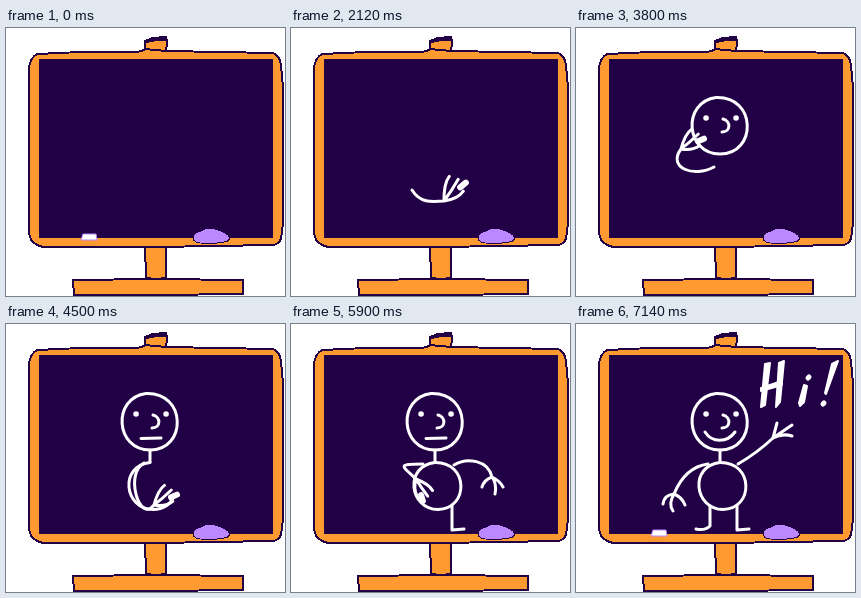
An HTML page that plays this animation: 279x268 px, repeating every 8000 ms.

```html
<!DOCTYPE html>
<html lang="en">
<head>
<meta charset="utf-8">
<title>Chalkboard greeting</title>
<style>
  html, body { margin: 0; width: 100%; height: 100%; overflow: hidden; background: #fff; }
  svg { display: block; width: 100%; height: 100%; }
  .board { fill: #ff9a30; stroke: #220046; stroke-width: 2; stroke-linejoin: round; shape-rendering: crispEdges; }
  .line { fill: none; stroke: #fff; stroke-width: 3; stroke-linecap: round; stroke-linejoin: round; }
  .dot { stroke-width: 5.5; }
</style>
</head>
<body>
<svg viewBox="0 0 279 268">
  <g class="board">
    <path d="M139 14L146 10L160 9L161 13L160 25H140Z"/>
    <path d="M139 13L147 10L159 9.500L161 12L150 12L140 14Z" fill="#220046"/>
    <path d="M139 217H160L160 250L150 251L140 250Z"/>
    <path d="M67 252L150 251L237 252L237 266L150 267L68 267Z"/>
    <path d="M31 26Q80 23 130 24L136 23L139 21L160 23L267 25Q274 28 275 37L277 60L277 195L275 211Q272 217 266 217L150 219L40 219Q31 219 25 212L23 205L23 40Q24 30 31 26Z"/>
    <path d="M33 31H267V210H33Z" fill="#220046" stroke="none"/>
    <path d="M187 210Q188 204 195 203Q203 198 212 202Q222 205 224 210Q222 215 214 214Q207 217 199 215Q188 216 187 210Z" fill="#bb88ff" stroke-width="1"/>
  </g>
  <path id="shelf" d="M77 206H90L91 212H75Z" fill="#fff" stroke="#bb88ff"/>

  <g class="line">
    <path id="firstArm" d="M121 162C129 175 140 174 153 173Q157 164 165 160Q157 164 153 173Q165 163 177 164Q165 163 153 173Q164 174 177 171"/>
    <path id="eyeL" class="dot" d="M130 90h.1"/>
    <path id="eyeR" class="dot" d="M160 90h.1"/>
    <path id="nose" d="M147 91C155 93 155 104 146 104"/>
    <path id="head" d="M140 69.500C106 74 109 126 144 126C181 126 181 68 140 69.500"/>
    <path id="mouth" d="M135 114.500L155 114"/>
    <path id="neck" d="M144 126V138"/>
    <path id="body" d="M144 138.500C113 142 118 185 147 185.500C178 185 178 138 144 138.500"/>
    <path id="armDown" d="M163 141C176 133 197 136 201 153Q209 157 212 163Q209 157 201 153Q206 160 204 170Q206 160 201 153Q193 156 191 163"/>
    <path id="legR" d="M161 181L161 206L173 205"/>
    <path id="legL" d="M134 182L134 202Q129 207 120 205"/>
    <path id="smile" d="M129 108C136 119 151 119 159 108"/>
    <g id="finale">
      <path d="M132 140C117 142 105 153 98 170Q88 171 87 180M98 170Q92 180 97 187M98 170Q106 173 109 181M162 140Q181 129 197 114"/>
      <path id="wave" d="M201 99L197 114L216 101M197 114Q206 109 216 112"/>
      <g aria-label="Hi!" fill="#fff" stroke-width="2">
        <path d="M189 40L194 39L189 81L185 83ZM203 39L208 37L204 78L200 83ZM185 64L206 57L206 61L185 67Z"/>
        <path d="M228 61L231 62L228 78L224 82L223 79ZM256 40L262 37L250 70L249 69Z"/>
        <path stroke-width="5" d="M232 54l1-1M247 80l1-1"/>
      </g>
    </g>
    <path id="arm"/>
    <path id="chalk" stroke-width="6"/>
  </g>
</svg>
<script>
const $ = id => document.getElementById(id);

// shoulder point, its curve handle, the wrist's curve handle, wrist relative to chalk
const ARMS = {
  reach: [121, 162, 8, 13, -13, 1, -19, 16],
  up:    [136, 143, 14, 8, 0, 24, -4, 20],
  left:  [138, 139, -20, 11, -14, 19, -20, 9],
  cross: [135, 138, 1, 28, -22, 2, -19, 7],
  low:   [132, 140, -26, 0, -15, -14, -6, -19]
};

// what the chalk does: stroke id or resting point, first and last step, arm, step of erasure
const MOVES = [
  [[83, 209], -2, -2, 'reach'],
  ['firstArm', 1, 4, 'reach', 5],
  [[172, 157], 5, 5, 'reach'],
  ['eyeL', 7, 7, 'up'],
  ['eyeR', 9, 9, 'up'],
  [[167, 102], 10, 10, 'up'],
  ['nose', 11, 12, 'up'],
  ['head', 13, 16, 'left'],
  [[125, 112], 17, 17, 'left'],
  ['mouth', 18, 19, 'left', 35],
  ['neck', 20, 20, 'left'],
  ['body', 21, 23, 'left'],
  ['armDown', 25, 28, 'cross', 37],
  ['legR', 30, 31, 'low'],
  [[131, 174], 32, 32, 'low'],
  ['legL', 33, 34, 'low'],
  ['smile', 35, 35, 'low'],
  [[83, 207], 36, 36, 'low']
].map(([what, first, last, arm, gone = Infinity]) => {
  const path = typeof what === 'string' ? $(what) : null;
  return { path, point: what, first, last, arm: ARMS[arm], gone, length: path ? path.getTotalLength() : 0 };
});

const clamp = x => Math.max(0, Math.min(1, x));
const mix = (a, b, u) => a.map((v, i) => v + (b[i] - v) * u);
const show = (el, on) => el.setAttribute('visibility', on ? 'visible' : 'hidden');

function tipAt(move, u) {
  if (!move.path) return move.point;
  const p = move.path.getPointAtLength(u * move.length);
  return [p.x, p.y];
}

function stepAt(t) {
  if (t < 1400) return -2;
  if (t >= 7140) return 40;
  if (t >= 6940) return 39;
  return Math.floor((t - 1420) / 140);
}

const progress = (m, n) => clamp((n - m.first + 1) / (m.last - m.first + 1));

function poseAt(n) {
  const i = MOVES.findLastIndex(m => m.first <= n);
  const now = MOVES[i], next = MOVES[i + 1];
  if (n <= now.last || !next) return [...tipAt(now, progress(now, n)), ...now.arm];
  const u = (n - now.last) / (next.first - now.last);
  return mix([...tipAt(now, 1), ...now.arm], [...tipAt(next, 0), ...next.arm], u);
}

function drawHand(n) {
  const [x, y, sx, sy, ax, ay, bx, by, gx, gy] = poseAt(n);
  const wx = x + gx, wy = y + gy;
  const at = (along, side) => `${wx - along * gx + side * gy} ${wy - along * gy - side * gx}`;
  const finger = (along, side, bow) => `M${wx} ${wy}Q${at(0.45, bow)} ${at(along, side)}`;
  $('arm').setAttribute('d', `M${sx} ${sy}C${sx + ax} ${sy + ay} ${wx + bx} ${wy + by} ${wx} ${wy}` +
    finger(0.85, 0.2, 0.3) + finger(1, -0.3, -0.1) + finger(0.8, -0.62, -0.55));
  $('chalk').setAttribute('d', `M${at(0.85, 0)}L${at(1.15, 0)}`);
}

function render(n) {
  const resting = n < -1 || n > 36;
  show($('shelf'), resting);
  show($('chalk'), !resting);
  show($('arm'), !resting && n >= 5);
  show($('finale'), n > 36);
  $('wave').setAttribute('transform', `rotate(${n % 2 ? -28 : 0} 197 114)`);
  if (!resting) drawHand(n);
  for (const m of MOVES) {
    if (!m.path) continue;
    show(m.path, n >= m.first && n < m.gone);
    const u = progress(m, n);
    m.path.setAttribute('stroke-dasharray', u < 1 ? `${u * m.length} 999` : 'none');
  }
}

function frame() {
  render(stepAt(performance.now() % 8000));
  requestAnimationFrame(frame);
}
frame();
</script>
</body>
</html>
```
